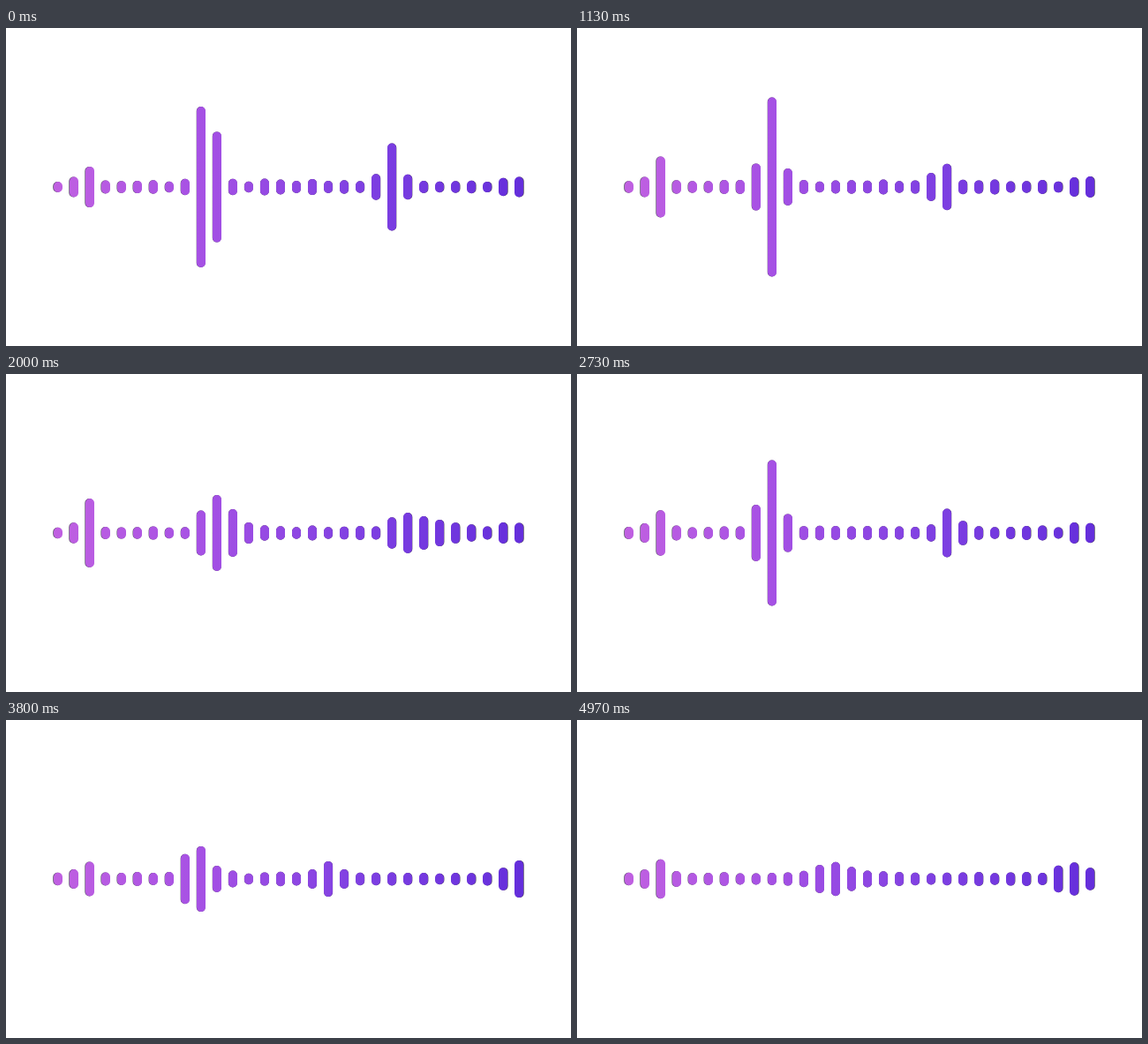
Write an HTML page with a canvas that moves like this. It is 640 px wide and 360 px high and loops after 5000 ms.

```html
<!DOCTYPE html>
<html lang="en">
<head>
<meta charset="utf-8">
<title>Sound wave</title>
<style>
  html, body { margin: 0; width: 100%; height: 100%; overflow: hidden; background: #fff; }
  canvas { display: block; }
</style>
</head>
<body>
<canvas id="wave" width="640" height="360"></canvas>
<script>
const LOOP = 5000, FPS = 30, LAST = 149;
const BARS = 30, FIRST_X = 59, PITCH = 18, MID_X = 320, MID_Y = 180, WIDTH = 10;
const RISE = 0.5, SWELL = 110, SWELL_STEPS = 12;
const AIR = [28.4, 11, 0.9];

// Key points of the sound: the gain of the bass bar, and peaks as [bar, gain, falloff].
const KEYS = [
  { at: 0,    bass: 34, voice: [9.38, 223, 0.51], upper: [20.97, 84, 0.53] },
  { at: 34,   bass: 55, voice: [8.9, 190, 0.55],  upper: [19.7, 42, 0.5] },
  { at: 60,   bass: 65, voice: [9.6, 75, 1.2],    upper: [21.4, 30, 2.5] },
  { at: 82,   bass: 38, voice: [8.77, 158, 0.65], upper: [19.97, 40, 0.7] },
  { at: 102,  bass: 32, voice: [8, 136, 1.15],    upper: [18, 24, 0.6], air: [29, 48, 0.5] },
  { at: 126,  bass: 21, voice: [9, 7, 0.5],       upper: [16, 29, 0.7] },
  { at: LAST, bass: 32, voice: [9, 0, 0.5],       upper: [12.3, 23, 1.6], air: [27.4, 24, 1.3] }
];

const ctx = document.getElementById("wave").getContext("2d");
const fill = ctx.createLinearGradient(54, 0, 586, 0);
fill.addColorStop(0, "#c060e1");
fill.addColorStop(0.31, "#a651e4");
fill.addColorStop(0.65, "#7f40e2");
fill.addColorStop(1, "#642edb");

const mix = (a, b, u) => a + (b - a) * u;
const mixPeak = (a, b, u) => a.map((v, k) => mix(v, b[k], u));

function noise(bar, step) {
  const v = Math.sin(bar * 12.9898 + step * 78.233) * 43758.5453;
  return v - Math.floor(v);
}

// A bell with a steep left side and its own falloff to the right.
function bell(bar, [center, gain, falloff]) {
  const d = bar - center, width = d < 0 ? RISE : falloff;
  return gain * Math.exp(-d * d / (2 * width * width));
}

// Steps run at 30 per second; the second step of every six is held.
function stepAt(time) {
  const step = Math.min(LAST, Math.floor((time + 4) * FPS / 1000));
  return step % 6 === 1 ? step - 1 : step;
}

function soundAt(step) {
  const k = Math.max(1, KEYS.findIndex(key => key.at >= step));
  const a = KEYS[k - 1], b = KEYS[k], span = b.at - a.at;
  const u = (step - a.at) / span;
  const ease = (1 - Math.cos(Math.PI * u)) / 2;
  const voice = mixPeak(a.voice, b.voice, ease);
  // Syllables swell between the key points.
  voice[1] += SWELL * Math.sin(Math.PI * u * Math.round(span / SWELL_STEPS)) ** 2;
  return {
    bass: [2, mix(a.bass, b.bass, ease), 0.3],
    voice,
    upper: mixPeak(a.upper, b.upper, ease),
    air: mixPeak(a.air || AIR, b.air || AIR, ease)
  };
}

function heightsAt(step) {
  const peaks = Object.values(soundAt(step));
  return Array.from({ length: BARS }, (_, bar) => {
    const rest = 12 + 3 * noise(bar, 0) + 4 * noise(bar, step) ** 2;
    return peaks.reduce((h, peak) => h + bell(bar, peak), rest);
  });
}

function drawBars(heights, spread, color) {
  ctx.beginPath();
  heights.forEach((h, bar) => {
    const x = FIRST_X + bar * PITCH;
    const shift = spread * (x - MID_X) / MID_X;
    ctx.roundRect(x + shift - WIDTH / 2, MID_Y - h / 2, WIDTH, h, WIDTH / 2);
  });
  ctx.fillStyle = color;
  ctx.fill();
}

function tick() {
  const heights = heightsAt(stepAt(performance.now() % LOOP));
  ctx.clearRect(0, 0, 640, 360);
  drawBars(heights, 0.9, "rgba(20, 5, 45, 0.75)"); // dark fringe on the outer sides
  drawBars(heights, 0, fill);
  requestAnimationFrame(tick);
}
tick();
</script>
</body>
</html>
```
